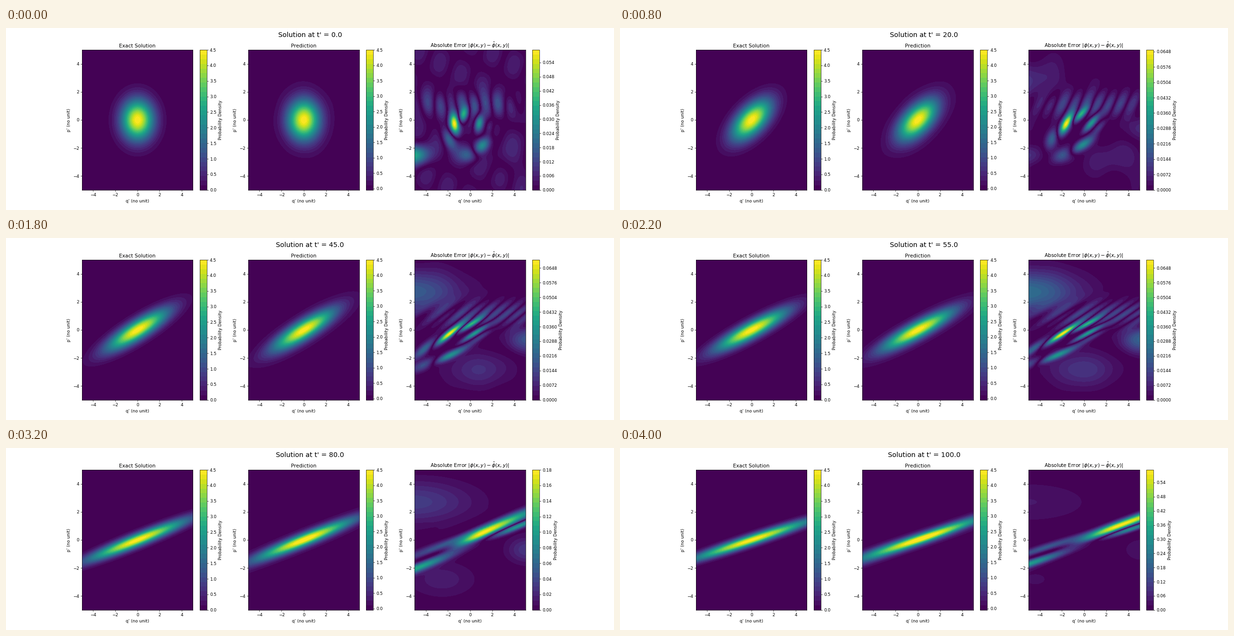
Write a matplotlib script that moves like this. It is 1280x384 px and loops after 4200 ms.

```python
import numpy as np
import matplotlib.pyplot as plt
from matplotlib.animation import FuncAnimation
from matplotlib.colors import ListedColormap
from matplotlib.ticker import MaxNLocator

FRAMES, INTERVAL, DT = 21, 200, 5.0
SHEAR = 0.0357          # q drift per unit time and momentum
PEAK = 4.5
BANDS = 30

NX, NY = 234, 296
xs = (np.arange(NX) + 0.5) / NX * 10 - 5
ys = (np.arange(NY) + 0.5) / NY * 10 - 5
Q, P = np.meshgrid(xs, ys)


def bell(x, center=0.0, sigma=1.0):
    return np.exp(-0.5 * ((x - center) / sigma) ** 2)


def smooth(x):
    x = np.clip(x, 0, 1)
    return x * x * (3 - 2 * x)


def exact(t):
    return PEAK * bell(Q - SHEAR * t * P) * bell(P)


def error_peak(t):
    """Slow rise that turns into near exponential growth."""
    times = [0, 25, 55, 60, 70, 80, 90, 100]
    peaks = [0.0592, 0.0666, 0.06878, 0.0703, 0.0985, 0.179, 0.3399, 0.592]
    return np.exp(np.interp(t, times, np.log(peaks)))


def lobe(q0, q, p, height, size):
    """Oval bump lying along the circle around the origin."""
    r = np.hypot(q, p)
    c, s = -p / r, q / r
    dq, dp = q0 - q, P - p
    return height * bell(c * dq + s * dp, 0, size) * bell(c * dp - s * dq, 0, 0.6 * size)


def carried(t):
    """Error lobes and streaks that drift along with the flow."""
    q0 = Q - SHEAR * t * P
    lobes = [(-1.4, -0.27, 0.062, 0.53), (-0.6, 0.36, -0.034, 0.45),
             (0.8, -0.22, -0.036, 0.45), (1.1, -1.8, 0.030, 0.58),
             (-1.9, -1.35, -0.022, 0.60), (-0.1, -2.5, -0.018, 0.65),
             (1.75, -0.5, 0.012, 0.45)]
    out = sum(lobe(q0, *args) for args in lobes)
    streaks = np.cos(np.pi * (q0 + 0.15 * (P - 1) - 0.4) / 1.05)
    return out + 0.015 * streaks * bell(P, 1.1, 0.65) * bell(q0, 0, 3.5)


def inflow(t):
    """Broad lobes near the borders and a faint fading ripple."""
    left = 0.0004 * t * bell(Q, -5, 2 + 0.02 * t) * bell(P, 2.7, 1.05)
    right = 0.00035 * t * bell(Q, 5.1, 1.2) * bell(P, -0.7, 0.65)
    low = 0.004 * np.exp(t / 60) * bell(Q, 4.9 - 2.6 * SHEAR * t, 2.1) * bell(P, -2.8, 0.9)
    corner = 0.034 * np.exp(-t / 14) * bell(Q, -5, 0.95) * bell(P, -2.5, 0.5)
    ripple = 0.006 * np.exp(-t / 18) * np.cos(1.4 * Q - 0.6 * P) * np.cos(1.1 * P + 0.5 * Q)
    return low + corner + ripple - left - right


def ridge(t):
    """Late error along the stretched ridge, with unit height."""
    kt = SHEAR * t
    w = 1 / np.sqrt(1 + kt * kt)
    u = (P - kt * w * w * Q) / w
    late = (t - 80) / 20
    mid = 1.1 + 2 * late
    span = np.where(Q < mid, 1.7 + 0.7 * late, 3.2 + 1.2 * late)
    out = bell(u, 0.35 + 0.13 * Q, 0.85) * bell(Q, mid, span)
    out -= 0.52 * bell(u, -1.1, 0.5) * bell(Q, 4.2, 1.7)
    out += 0.52 * bell(u, -1.55, 0.7) * bell(Q, -5, 2.3)
    out += (0.2 + 0.06 * late) * bell(u, 1.4, 0.65) * bell(Q, -3.8, 2.4)
    out -= 0.1 * bell(u, -0.1, 0.4) * bell(Q, -3, 2)
    return out


def error(t):
    top = error_peak(t)
    m = smooth((t - 53) / 25)
    e = (1 - 0.8 * m) * carried(t) + m * top * ridge(t) + inflow(t)
    return e * top / np.abs(e).max()


def scale(low, high):
    """Rounded upper end of a colour scale and its tick places."""
    levels = MaxNLocator(101, min_n_ticks=1).tick_values(low, high)
    stride = int(np.ceil(len(levels) / 10))
    zero = int(np.argmin(np.abs(levels)))
    return levels[-1], levels[zero % stride::stride]


cmap = ListedColormap(plt.get_cmap("viridis")(np.linspace(0.004, 0.996, BANDS)))
fig, axes = plt.subplots(1, 3, figsize=(20, 6), dpi=64)
heading = fig.suptitle("", fontsize=16)


def panel(ax, title, low, high):
    im = ax.imshow(np.zeros_like(Q), extent=(-5, 5, -5, 5), origin="lower",
                   aspect="auto", interpolation="bilinear", cmap=cmap,
                   vmin=low, vmax=high)
    ax.set_title(title)
    ax.set_xlabel("q' (no unit)")
    ax.set_ylabel("p' (no unit)")
    ax.set_xticks(range(-4, 5, 2))
    ax.set_yticks(range(-4, 5, 2))
    bar = fig.colorbar(im, ax=ax, label="Probability Density")
    bar.set_ticks(np.arange(0, high + 0.01, 0.5))
    return im, bar


im_exact, _ = panel(axes[0], "Exact Solution", 0, PEAK)
im_pred, _ = panel(axes[1], "Prediction", -0.05, PEAK)
im_err, bar_err = panel(
    axes[2], r"Absolute Error $|\phi(x,y)-\hat{\phi}(x,y)|$", 0, 0.06)


def update(i):
    t = i * DT
    phi, e = exact(t), error(t)
    heading.set_text(f"Solution at t' = {t:.1f}")
    im_exact.set_data(phi)
    im_pred.set_data(phi + e)
    im_err.set_data(np.abs(e))
    top, ticks = scale(0, error_peak(t))
    im_err.set_clim(0, top)
    bar_err.set_ticks(ticks)
    return im_exact, im_pred, im_err, heading


anim = FuncAnimation(fig, update, frames=FRAMES, interval=INTERVAL,
                     repeat=True, repeat_delay=0, blit=False)
plt.show()
```
